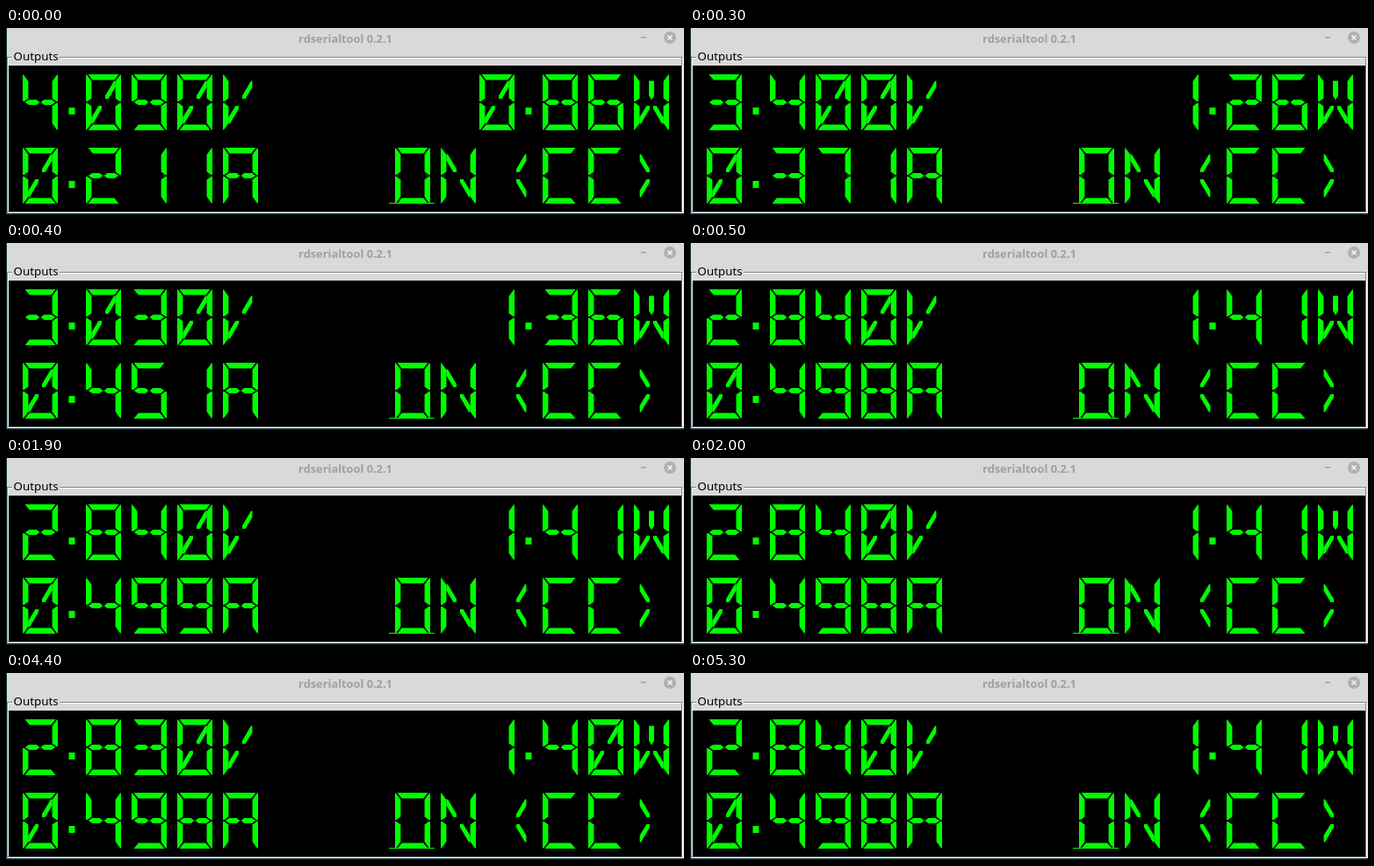
These frames come from a looping animation (772 px wide and 214 px high, 8 s). An HTML page:

```html
<!DOCTYPE html>
<html lang="en">
<head>
<meta charset="utf-8">
<title>rdserialtool 0.2.1</title>
<style>
  html, body { margin: 0; width: 100%; height: 100%; overflow: hidden; background: #d9d9d9; }
  svg { display: block; width: 772px; height: 214px; }
  .title { font: 700 12.8px "Open Sans", "Noto Sans", sans-serif; fill: #a0a0a0; }
  .label { font: 13.33px "Noto Sans", "Open Sans", sans-serif; fill: #000; }
</style>
</head>
<body>
<svg viewBox="0 0 772 214" role="img" aria-label="Power supply readout">
  <rect width="772" height="214" fill="#d9d9d9"/>
  <text class="title" x="386.5" y="17" text-anchor="middle">rdserialtool 0.2.1</text>
  <rect x="723" y="10" width="6" height="1.5" fill="#a0a0a0"/>
  <circle cx="756" cy="11" r="7" fill="#b0b0b0"/>
  <path d="M753.5 8.5l5 5m0-5l-5 5" stroke="#f4f4f4" stroke-width="1.6"/>

  <g shape-rendering="crispEdges">
    <path d="M0 0h1v212h771v2H0z" fill="#0c2a33"/>
    <rect x="3" y="43" width="766" height="168" fill="#000"/>
    <g fill="none">
      <rect x="2.5" y="34.5" width="768" height="177" stroke="#fff"/>
      <rect x="1.5" y="33.5" width="768" height="177" stroke="#828282"/>
    </g>
    <rect x="7" y="26" width="54" height="15" fill="#d9d9d9"/>
  </g>
  <text class="label" x="8.5" y="37">Outputs</text>

  <g fill="#0f0">
    <path id="volts"/>
    <path id="watts"/>
    <path id="amps"/>
    <path id="mode"/>
    <rect x="436" y="200" width="52" height="1" shape-rendering="crispEdges"/>
  </g>
</svg>
<script>
(() => {
  const W = 40, H = 64, THICK = 6.4, PITCH = 52;

  // Fourteen-segment cell: five base shapes, the rest are mirror images.
  const flipX = pts => pts.map(([x, y]) => [W - x, y]);
  const flipY = pts => pts.map(([x, y]) => [x, H - y]);

  const cap = [[2.5, 0], [W - 2.5, 0], [W - 7.8, THICK], [7.8, THICK]];
  const side = [[0, 0.6], [1, 0.6], [THICK, 8], [THICK, 27.6], [1.6, 31], [0, 31]];
  const bar = [[2.8, 32], [7.2, 29], [15.8, 29], [19.3, 32], [15.8, 35], [7.2, 35]];
  const slash = [[32, 7.6], [33.4, 7.6], [33.4, 15], [25.6, 28], [22, 28], [22, 24.4]];
  const post = [[17, 7.6], [23, 7.6], [23, 24.5], [20, 29.5], [17, 24.5]];

  const SEG = {
    a: cap, d: flipY(cap),
    f: side, b: flipX(side), e: flipY(side), c: flipX(flipY(side)),
    g: bar, G: flipX(bar),
    j: slash, h: flipX(slash), n: flipY(slash), l: flipX(flipY(slash)),
    i: post,
    ".": [[0.5, 38], [7.5, 38], [7.5, 46], [0.5, 46]]
  };

  const GLYPH = {
    0: "abcdefjl", 1: "bc", 2: "abgGed", 3: "abcdgG", 4: "fgGbc",
    5: "afgGcd", 6: "afgGecd", 7: "abc", 8: "abcdefgG", 9: "abcdfgG",
    A: "abcefgG", C: "adef", N: "febchn", O: "abcdef", V: "fejl",
    W: "febciln", "(": "jn", ")": "hl", ".": ".", " ": ""
  };
  const ADVANCE = { ".": 20, " ": 12 };

  const outline = (pts, x, y) =>
    "M" + pts.map(([px, py]) => `${px + x} ${py + y}`).join("L") + "Z";

  function show(id, text, x, y) {
    let d = "";
    for (const ch of text) {
      for (const s of GLYPH[ch]) d += outline(SEG[s], x, y);
      x += ADVANCE[ch] || PITCH;
    }
    document.getElementById(id).setAttribute("d", d);
  }

  // Readings as [start in ms, value]; power follows from them.
  const LOOP = 8000;
  const VOLTS = [[0, 4.09], [300, 3.4], [400, 3.03], [500, 2.84], [4400, 2.83], [5300, 2.84]];
  const AMPS = [[0, 0.211], [300, 0.371], [400, 0.451], [500, 0.498],
                [700, 0.499], [1000, 0.498], [1900, 0.499], [2000, 0.498]];

  const valueAt = (steps, t) => steps.filter(([from]) => from <= t).pop()[1];

  function draw(ms) {
    const t = ms % LOOP;
    const volts = valueAt(VOLTS, t), amps = valueAt(AMPS, t);
    const watts = Math.floor(volts * amps * 100) / 100;
    show("volts", volts.toFixed(3) + "V", 19, 53);
    show("amps", amps.toFixed(3) + "A", 19, 137);
    show("watts", watts.toFixed(2) + "W", 539, 53);
  }

  show("mode", "ON (CC)", 443, 137);
  const start = performance.now();
  function tick() {
    draw(performance.now() - start);
    requestAnimationFrame(tick);
  }
  tick();
})();
</script>
</body>
</html>
```
